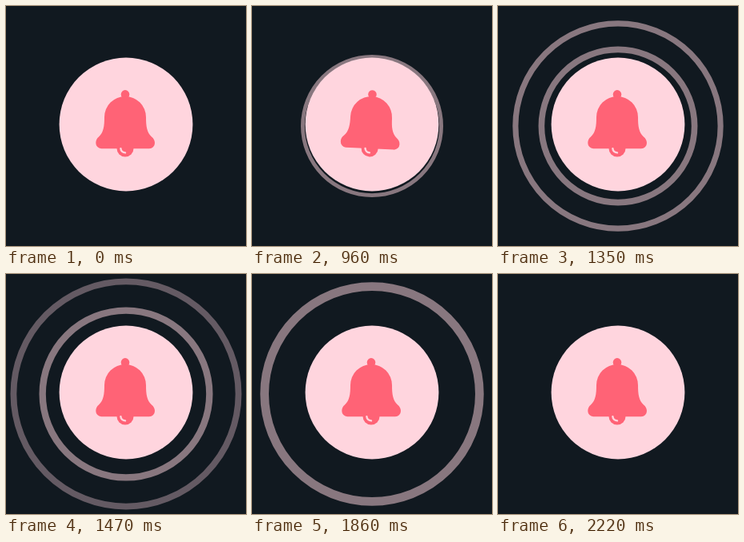
Recreate the animation shown at these times as an HTML page. Size 300 px wide and 300 px high, loop 2.73 s.

```html
<!DOCTYPE html>
<html>
<head>
<meta charset="utf-8">
<title>Ringing bell</title>
<style>
  html, body { margin: 0; height: 100%; overflow: hidden; background: #111920; }
  svg { display: block; width: 100%; height: 100%; }
</style>
</head>
<body>
<svg viewBox="0 0 300 300">
  <g fill="none" stroke="#ffd5de">
    <circle id="fast" cx="150" cy="150"/>
    <circle id="slow" cx="150" cy="150"/>
  </g>
  <circle cx="150" cy="148" r="83.4" fill="#ffd5de"/>
  <g id="bell" fill="#ff6376">
    <circle cx="149" cy="110.4" r="5.3"/>
    <circle cx="149" cy="178" r="10.5"/>
    <path d="M149 113A26 26 0 0 1 175 139C175 150 176 158 182 163.5C184.500 165.500 186 168 186 171.200A7 7 0 0 1 179 178.200H119A7 7 0 0 1 112.300 171.200C112.300 168 113.500 165.500 116 163.500C122 158 123 150 123 139A26 26 0 0 1 149 113Z"/>
    <path d="M143.400 178.200A5.600 5.600 0 0 0 149 183.400" fill="none" stroke="#ffd5de" stroke-width="2.400" stroke-linecap="round"/>
  </g>
</svg>
<script>
const LOOP = 2730, FRAME = 30;
const SWING = { start: 450, end: 1200, period: 300, decay: 0.0123 };
// edge: outer radius at time `at`, then speed and acceleration per ms
const rings = [
  { id: 'fast', at: 960, edge: 89, speed: 0.1118, accel: -5.9e-6, weight: 0.054, show: 840, fade: 1380, end: 1680 },
  { id: 'slow', at: 1200, edge: 88.5, speed: 0.0717, accel: 9e-6, weight: 0.077, show: 1050, fade: 1860, end: 2220 }
];
const get = id => document.getElementById(id);
const clamp = x => Math.max(0, Math.min(1, x));

function drawRing(ring, t) {
  const dt = t - ring.at;
  const outer = ring.edge + ring.speed * dt + ring.accel * dt * dt;
  const width = outer * ring.weight;
  const el = get(ring.id);
  el.setAttribute('r', outer - width / 2);
  el.setAttribute('stroke-width', width);
  el.setAttribute('opacity', t < ring.show ? 0 : 0.5 * clamp((ring.end - t) / (ring.end - ring.fade)));
}

function bellAngle(t) {
  if (t < SWING.start || t > SWING.end) return 0;
  const phase = (t - SWING.start) / SWING.period;
  return -SWING.decay * (SWING.end - t) * Math.sin(2 * Math.PI * phase);
}

function draw(now) {
  const t = Math.floor(now % LOOP / FRAME) * FRAME;
  rings.forEach(ring => drawRing(ring, t));
  get('bell').setAttribute('transform', `rotate(${bellAngle(t)} 149 140)`);
}

const began = performance.now();
function tick() {
  draw(performance.now() - began);
  requestAnimationFrame(tick);
}
tick();
</script>
</body>
</html>
```
